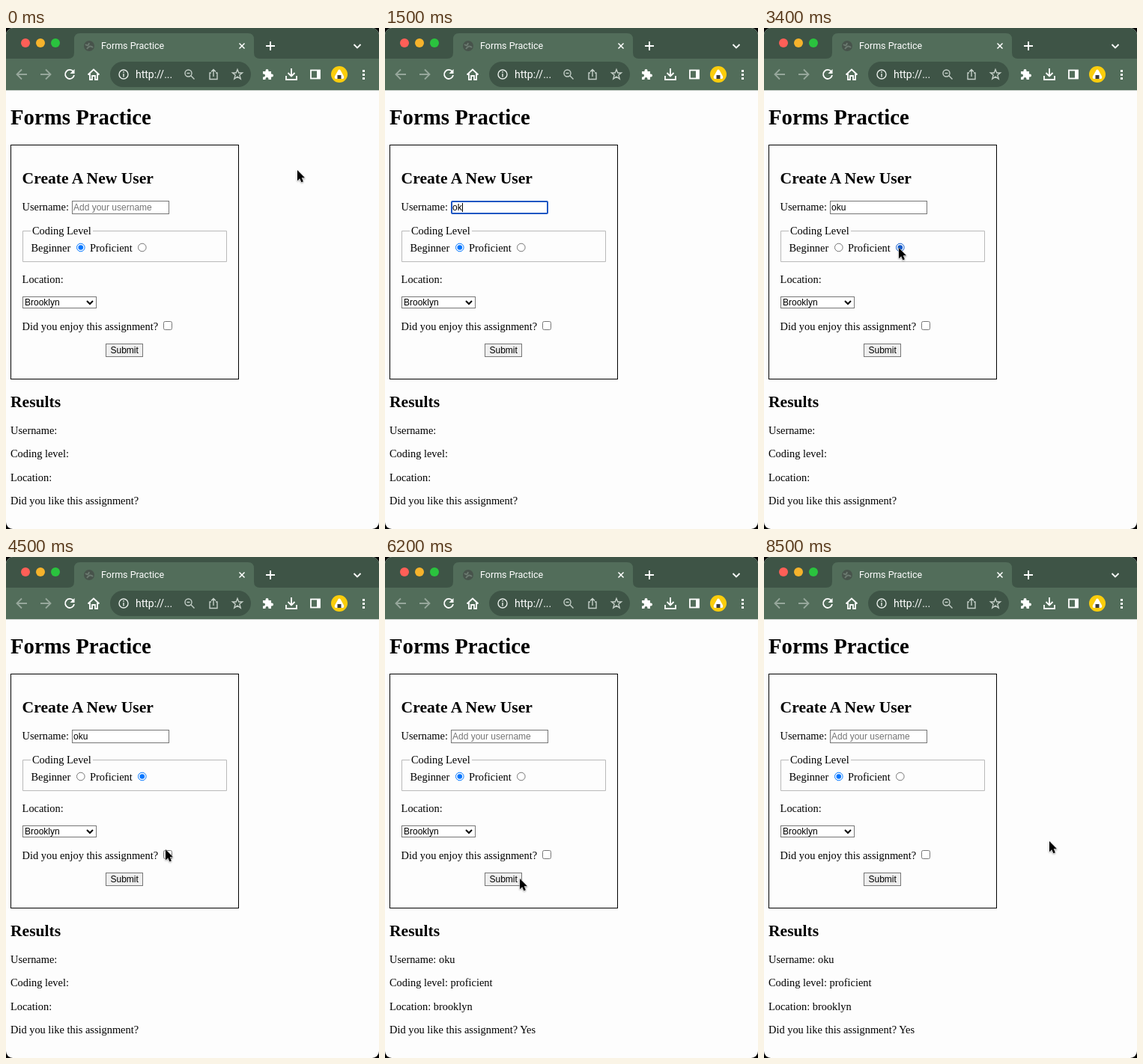
An HTML page for the animation above (8600 ms loop, 498 by 670 pixels).

```html
<!DOCTYPE html>
<html lang="en">
<head>
<meta charset="utf-8">
<title>Forms Practice</title>
<style>
  html, body { margin: 0; width: 100%; height: 100%; overflow: hidden; background: #000; }
  svg { display: block; width: 498px; height: 670px; border-radius: 9px; background: #fdfdfd; }
  text { white-space: pre; }
  .page { font: 14.4px "Liberation Serif", serif; }
  .page .h1 { font-size: 28.8px; font-weight: bold; }
  .page .h2 { font-size: 21.6px; font-weight: bold; }
  .control { font: 12px "Liberation Sans", sans-serif; }
  .chrome { font: 12.5px Roboto, sans-serif; }
  .icon { fill: none; stroke: #fff; stroke-width: 1.8; }
  .dim { stroke: #96a79b; }
  .small { stroke: #c3cec7; stroke-width: 1.4; }
  .box { fill: #fff; stroke: #767676; }
  #arrow { filter: drop-shadow(0 1px 1px rgba(0, 0, 0, .4)); }
</style>
</head>
<body>
<svg viewBox="0 0 498 670">
  <g class="chrome">
    <rect width="498" height="42" fill="#3e5446"/>
    <rect y="41" width="498" height="43" fill="#526d5a"/>
    <path d="M83 41Q91 41 91 33V15Q91 7 99 7H323Q331 7 331 15V33Q331 41 339 41Z" fill="#526d5a"/>
    <path d="M0 83.5H498" stroke="#c9d0cb"/>
    <circle cx="26" cy="20" r="6" fill="#ff5f57"/>
    <circle cx="46" cy="20" r="6" fill="#f6b32c"/>
    <circle cx="66" cy="20" r="6" fill="#2ac33e"/>
    <circle cx="111" cy="24" r="7" fill="#47534b"/>
    <path d="M106 22Q110 25 111 20M108 28Q112 22 116 26" fill="none" stroke="#6a796f" stroke-width="2"/>
    <text x="127" y="28" fill="#fff">Forms Practice</text>
    <g class="icon">
      <path d="M311.5 20.5L318.5 27.5M318.5 20.5L311.5 27.5" stroke-width="1.5"/>
      <path d="M353 18V30M347 24H359M464.500 22L469 26.500L473.500 22"/>
      <path class="dim" d="M28 62H15M21 55.500L14.500 62L21 68.500M46 62H59M53 55.500L59.500 62L53 68.500"/>
      <path d="M90 58.500A6 6 0 1 0 91 63"/>
      <path d="M91.500 55V61H85.500Z" fill="#fff" stroke="none"/>
      <path d="M109.500 62.500L117 55.500L124.500 62.500M112 61V69H115V64H119V69H122V61"/>
    </g>
    <rect x="139" y="45" width="188" height="34" rx="17" fill="#3e5446"/>
    <text x="173" y="67" fill="#fff" font-size="14">http://...</text>
    <g class="icon small">
      <circle cx="157" cy="62" r="6" stroke="#e8eeea"/>
      <path d="M157 61V65.500M157 58V59.800" stroke="#e8eeea"/>
      <circle cx="243.500" cy="60.500" r="4.500"/>
      <path d="M246.800 63.800L251.500 68.500M241.500 60.500H245.500"/>
      <path d="M274 60H272V68.500H282V60H280M277 65V55.500M274 58.500L277 55.500L280 58.500"/>
      <path d="M309 55.500L310.800 60H315.500L311.800 63L313.200 68L309 65.200L304.800 68L306.200 63L302.500 60H307.200Z"/>
    </g>
    <path d="M343 58H346.500V57A2 2 0 0 1 350.500 57V58H354V61.500H355A2 2 0 0 1 355 65.500H354V69H350.500V68A2 2 0 0 0 346.500 68V69H343V65.500H344A2 2 0 0 0 344 61.500H343Z" fill="#fff"/>
    <g class="icon">
      <path d="M381 54V64M376.500 60L381 64.500L385.500 60M374 64V69H388V64"/>
      <rect x="407" y="56.500" width="12" height="11"/>
      <path d="M417 57V67" stroke-width="4"/>
    </g>
    <circle cx="445" cy="62" r="11" fill="#fbcd0c"/>
    <path d="M443.500 56.500Q445 54.500 446.500 56.500L451 64.500Q452 68 449 68H441Q438 68 439 64.500Z" fill="#fff"/>
    <rect x="442.500" y="63" width="5" height="5" fill="#3b3b3b"/>
    <path d="M476 56H479V59H476ZM476 61H479V64H476ZM476 66H479V69H476Z" fill="#fff"/>
  </g>

  <g class="page">
    <text class="h1" x="6" y="129">Forms Practice</text>
    <rect x="6.500" y="156.500" width="304" height="313" fill="none" stroke="#000"/>
    <text class="h2" x="21.600" y="208">Create A New User</text>
    <text x="21.600" y="244">Username:</text>
    <path d="M33 271.500H22.500V312.500H294.500V271.500H116" fill="none" stroke="#b9b9b9"/>
    <text x="35" y="276">Coding Level</text>
    <text x="33.500" y="299">Beginner</text>
    <text x="112" y="299">Proficient</text>
    <text x="21.600" y="341">Location:</text>
    <text x="21.600" y="404">Did you enjoy this assignment?</text>
    <text class="h2" x="6" y="507">Results</text>
    <g id="results"></g>
  </g>

  <g class="control">
    <rect id="field" class="box"/>
    <text id="value" x="90" y="244"></text>
    <path id="caret" d="M0 234V246" stroke="#000"/>
    <g id="beginner" transform="translate(99.800 293.500)"><circle class="box" r="5.300"/><circle r="3.300"/></g>
    <g id="proficient" transform="translate(181.800 293.500)"><circle class="box" r="5.300"/><circle r="3.300"/></g>
    <rect class="box" x="22.500" y="359.500" width="98" height="15"/>
    <text x="25" y="371">Brooklyn</text>
    <path d="M108 365L112 369L116 365" fill="none" stroke="#000" stroke-width="2"/>
    <rect id="check" class="box" x="210.500" y="392.500" width="11" height="11" rx="2"/>
    <path id="tick" d="M212.800 398.200L215 400.500L219.300 395.300" fill="none" stroke="#fff" stroke-width="1.800"/>
    <rect id="submit" x="133.500" y="422.500" width="49" height="17" stroke="#767676"/>
    <text x="158.200" y="435" text-anchor="middle">Submit</text>
  </g>

  <g id="ring" fill="none">
    <circle stroke="#fff" stroke-width="6"/>
    <circle stroke="#000" stroke-width="3"/>
  </g>
  <path id="arrow" d="M0 0V14.200L3.200 11.300L5.400 16.300L7.900 15.200L5.700 10.300H10Z" stroke="#fff" stroke-width="1" paint-order="stroke"/>
  <g id="beam" fill="none">
    <path d="M-3-7Q0-7 0-4V5Q0 8-3 8M3-7Q0-7 0-4M0 5Q0 8 3 8M-2 3H2" stroke="#fff" stroke-width="2.500"/>
    <path d="M-3-7Q0-7 0-4V5Q0 8-3 8M3-7Q0-7 0-4M0 5Q0 8 3 8M-2 3H2" stroke="#000"/>
  </g>
</svg>
<script>
const LOOP = 8600, STEP = 100, NAME = "oku", BLUE = "#0075ff";
const $ = id => document.getElementById(id);
const set = (el, attrs) => { for (const k in attrs) el.setAttribute(k, attrs[k]); };
const show = (el, on) => { el.style.display = on ? "" : "none"; };

// Pointer stops: time, x, y
const path = [
  [0, 389, 190], [200, 389, 190], [800, 119, 243], [1700, 119, 243],
  [1900, 309, 203], [2300, 309, 203], [2800, 180, 294], [3500, 180, 294],
  [4500, 213, 391], [4600, 213, 396], [5000, 213, 396], [5500, 180, 430],
  [6200, 180, 430], [7000, 340, 406], [7300, 379, 382], [7600, 381, 380], [LOOP, 381, 380]
];
const clicks = [900, 1900, 2900, 4600, 5700];
const answers = [
  ["Username:", NAME], ["Coding level:", "proficient"],
  ["Location:", "brooklyn"], ["Did you like this assignment?", "Yes"]
];
const lines = answers.map((_, i) => {
  const line = document.createElementNS("http://www.w3.org/2000/svg", "text");
  set(line, { x: 6, y: 543 + 31.4 * i });
  return $("results").appendChild(line);
});

function pointerAt(t) {
  const i = path.findIndex(stop => stop[0] > t);
  const [t0, x0, y0] = path[i - 1], [t1, x1, y1] = path[i];
  const p = (t - t0) / (t1 - t0), e = p * p * (3 - 2 * p);
  return [x0 + (x1 - x0) * e, y0 + (y1 - y0) * e];
}

function drawRadio(id, on, color) {
  const [rim, dot] = $(id).children;
  rim.style.stroke = on ? color : "#767676";
  set(dot, { fill: color });
  show(dot, on);
}

function draw(t) {
  const [x, y] = pointerAt(t);
  const sent = t >= 5900, focused = t >= 900 && t < 1900;
  const typed = sent ? "" : NAME.slice(0, [1400, 1500, 1600].filter(k => t >= k).length);

  $("value").textContent = typed || "Add your username";
  set($("value"), { fill: typed ? "#000" : "#757575" });
  const inset = focused ? 1 : 0.5;
  set($("field"), { x: 88 + inset, y: 231 + inset, width: 130 - 2 * inset, height: 18 - 2 * inset, rx: focused ? 1 : 0 });
  $("field").style.stroke = focused ? "#1f57c3" : "#767676";
  $("field").style.strokeWidth = focused ? 2 : 1;
  show($("caret"), focused && t >= 1100);
  set($("caret"), { transform: `translate(${90.5 + (typed ? Math.round($("value").getComputedTextLength()) : 0)} 0)` });

  const proficient = t >= 3000 && !sent;
  const hover = Math.hypot(x - 181.8, y - 293.5) < 6;
  drawRadio("beginner", !proficient, BLUE);
  drawRadio("proficient", proficient, hover ? "#0b57c9" : BLUE);

  const checked = t >= 4700 && !sent;
  $("check").style.fill = checked ? BLUE : "#fff";
  $("check").style.stroke = checked ? BLUE : "#767676";
  show($("tick"), checked);
  set($("submit"), { fill: t >= 5700 && t < 5900 ? "#dcdcdc" : "#efefef" });
  lines.forEach((line, i) => { line.textContent = answers[i][0] + (sent ? " " + answers[i][1] : ""); });

  const click = clicks.find(c => t >= c && t < c + 300);
  show($("ring"), click !== undefined);
  for (const circle of $("ring").children) set(circle, { r: 10 + (t - click || 0) / 20 });

  const overField = x > 88 && x < 218 && y > 231 && y < 249;
  const hidden = t >= 1400 && t < 1800;
  show($("beam"), overField && !hidden);
  show($("arrow"), !overField && !hidden);
  for (const id of ["ring", "arrow", "beam"]) set($(id), { transform: `translate(${x} ${y})` });
}

const start = performance.now();
function tick() {
  const t = (performance.now() - start) % LOOP;
  draw(Math.floor(t / STEP) * STEP);
  requestAnimationFrame(tick);
}
tick();
</script>
</body>
</html>
```
